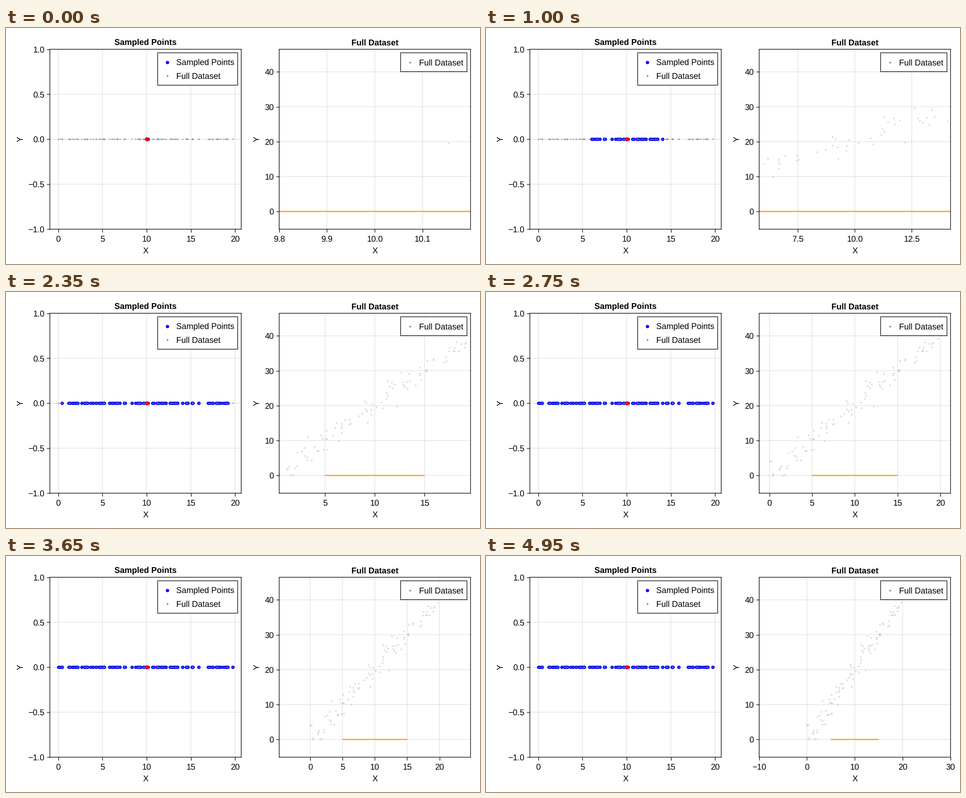
A matplotlib script for the animation above (5000 ms loop, 1058x529 px).

```python
import math

import matplotlib.pyplot as plt
import numpy as np
from matplotlib.animation import FuncAnimation
from matplotlib.patches import Rectangle

W, H = 1058, 529
DPI = 100
UNITS_W, UNITS_H = 800, 400          # layout grid
PT = W / UNITS_W * 72 / DPI          # points per layout unit
FRAMES, INTERVAL = 100, 50
CENTER = 10
TOP, BOTTOM = 36, 341                # both panels
BIG, MEDIUM, SMALL = 7.05, 5.64, 2.82  # dot diameters

plt.rcParams.update({
    "font.family": "Liberation Sans",
    "font.size": 14 * PT,
    "text.hinting": "none",
    "axes.linewidth": PT,
    "path.snap": False,
})

# Stretches of x that hold data; the gaps between them stay empty.
SPANS = [(0.02, 0.42), (1.17, 2.2), (2.65, 3.28), (3.66, 5.2), (5.79, 7.54),
         (8.35, 9.72), (10.68, 13.49), (14.06, 15.23), (15.86, 15.89),
         (16.95, 17.49), (17.87, 19.17)]
DENSITY = 6


def make_data():
    """Noisy points along y = 2x, plus two fixed ones."""
    rng = np.random.default_rng(4)
    x = np.concatenate([
        [lo, hi, *rng.uniform(lo, hi, round(DENSITY * (hi - lo)))]
        for lo, hi in SPANS])
    noise = np.clip(rng.normal(0, 2, x.size), -4.5, 4.5)
    y = np.maximum(0, 2 * x + noise)
    return np.append(x, [10.154, 19.72]), np.append(y, [19.6, 39.3])


def nice_ticks(lo, hi, ideal=5, fewest=3, most=10):
    """Wilkinson-style search over round steps."""
    span = hi - lo
    top = math.ceil(math.log10(span))
    best, best_score = [], -math.inf
    for power in range(top, top - 3, -1):
        for base, nice in ((1, 1), (5, 0.9), (2, 0.7), (2.5, 0.5), (3, 0.2)):
            step = base * 10.0 ** power
            first, last = math.floor(lo / step), math.ceil(hi / step)
            ticks = [k * step for k in range(first, last + 1)
                     if lo <= k * step <= hi]
            count = len(ticks)
            if not fewest <= count <= most:
                continue
            reaches_zero = lo <= 0 or last * step < 2 * span
            score = (max(0, 1 - abs(count - ideal) / ideal) / 4
                     + reaches_zero / 6
                     + 0.5 * span / ((count - 1) * step)
                     + nice / 4)
            if score > best_score + 1e-9:
                best, best_score = ticks, score
    return best


def tick_labels(ticks):
    digits = next((d for d in range(4)
                   if all(abs(t - round(t, d)) < 1e-6 for t in ticks)), 4)
    return [f"{t + 0.0:.{digits}f}".replace("-", "\u2212") for t in ticks]


def set_xticks(ax, ticks):
    ax.set_xticks(ticks, tick_labels(ticks))


def make_panel(left, right, title, ylabel_x, ylim, yticks):
    ax = fig.add_axes([left / UNITS_W, 1 - BOTTOM / UNITS_H,
                       (right - left) / UNITS_W, (BOTTOM - TOP) / UNITS_H])
    ax.set_ylim(ylim)
    ax.set_yticks(yticks, tick_labels(yticks))
    ax.set_axisbelow(True)
    ax.grid(color="black", alpha=0.12, linewidth=PT)
    ax.tick_params(length=5 * PT, width=PT)
    ax.tick_params(axis="x", pad=6 * PT)
    ax.tick_params(axis="y", pad=4 * PT)
    middle = (left + right) / 2
    overlay.text(middle, 29, title, weight="bold", ha="center")
    overlay.text(middle, 381.5, "X", ha="center")
    overlay.text(ylabel_x, (TOP + BOTTOM) / 2, "Y", rotation=90,
                 rotation_mode="anchor", ha="center", va="baseline")
    return ax


def dots(ax, x, y, size, color, **style):
    return ax.plot(x, y, "o", markersize=size * PT, markerfacecolor=color,
                   markeredgewidth=0, **style)[0]


def make_legend(left, right, bottom, entries):
    top = 42
    overlay.add_patch(Rectangle((left, top), right - left, bottom - top,
                                facecolor="white", edgecolor="black",
                                linewidth=PT))
    for row, (label, size, color) in enumerate(entries):
        y = top + 16 + 23 * row
        dots(overlay, [left + 16], [y], size, color)
        overlay.text(left + 31, y + 5.1, label)


fig = plt.figure(figsize=(W / DPI, H / DPI), dpi=DPI, facecolor="white")
overlay = fig.add_axes([0, 0, 1, 1], zorder=5)
overlay.set(xlim=(0, UNITS_W), ylim=(UNITS_H, 0))
overlay.axis("off")

xs, ys = make_data()

sample_ax = make_panel(74, 397, "Sampled Points", 28.7, (-1, 1),
                       [-1, -0.5, 0, 0.5, 1])
sample_ax.set_xlim(-0.965, 20.705)
set_xticks(sample_ax, range(0, 21, 5))
sampled = dots(sample_ax, [], [], MEDIUM, "blue")
dots(sample_ax, xs, 0 * xs, SMALL, "gray", alpha=0.5)
dots(sample_ax, [CENTER], [0], BIG, "red")

data_ax = make_panel(461, 784, "Full Dataset", 427.6, (-5.09, 46.48),
                     range(0, 41, 10))
dots(data_ax, xs, ys, SMALL, "gray", alpha=0.3)
data_ax.plot([5, 15], [0, 0], color="orange", linewidth=2 * PT,
             solid_capstyle="butt")

full_entry = ("Full Dataset", SMALL, "gray")
make_legend(256, 391, 97, [("Sampled Points", MEDIUM, "blue"), full_entry])
make_legend(666, 778, 74, [full_entry])


def update(frame):
    reach = (frame + 1) / 5
    inside = xs[np.abs(xs - CENTER) <= reach]
    sampled.set_data(inside, 0 * inside)
    lo, hi = CENTER - reach, CENTER + reach
    set_xticks(data_ax, nice_ticks(lo, hi))
    data_ax.set_xlim(lo, hi)
    return sampled,


animation = FuncAnimation(fig, update, frames=FRAMES, interval=INTERVAL,
                          repeat=True, repeat_delay=0, blit=False)
plt.show()
```
